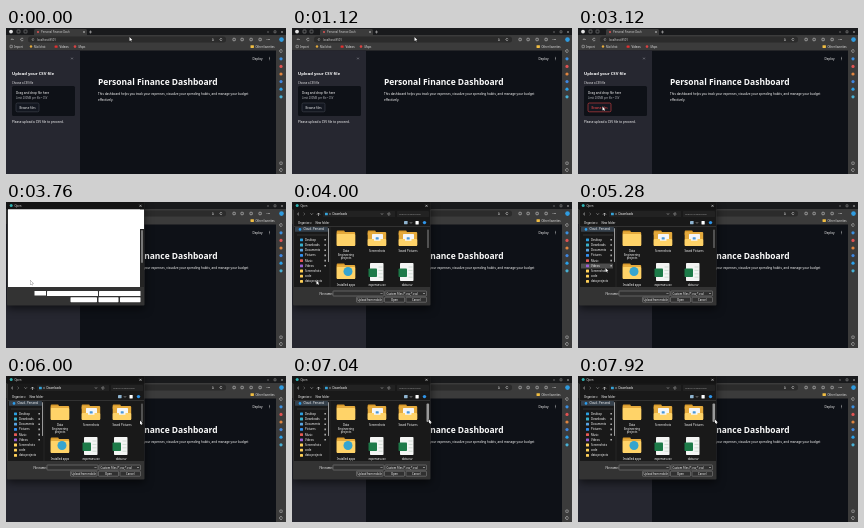
Recreate the animation shown at these times as an HTML page with a canvas. Size 280 by 146 pixels, loop 8000 ms.

```html
<!DOCTYPE html>
<html lang="en">
<head>
<meta charset="utf-8">
<title>Personal Finance Dashboard</title>
<style>
html, body { margin: 0; width: 100%; height: 100%; overflow: hidden; background: #0e1117; }
canvas { display: block; width: 280px; height: 146px; }
</style>
</head>
<body>
<canvas id="stage"></canvas>
<script>
const W = 280, H = 146, LOOP = 8000, STEP = 80;
const canvas = document.getElementById('stage');
const scale = window.devicePixelRatio || 1;
canvas.width = W * scale;
canvas.height = H * scale;
const g = canvas.getContext('2d');

function box(x, y, w, h, fill, r = 0, line) {
  g.beginPath();
  g.roundRect(x, y, w, h, r);
  if (fill) { g.fillStyle = fill; g.fill(); }
  if (line) { g.strokeStyle = line; g.lineWidth = 0.5; g.stroke(); }
}

function dot(x, y, r, fill) {
  g.beginPath();
  g.arc(x, y, r, 0, 7);
  g.fillStyle = fill;
  g.fill();
}

function ring(x, y, r, color) {
  g.beginPath();
  g.arc(x, y, r, 0.4, 6);
  g.strokeStyle = color;
  g.lineWidth = 0.6;
  g.stroke();
}

function path(color, ...pts) {
  g.beginPath();
  for (let i = 0; i < pts.length; i += 2) g.lineTo(pts[i], pts[i + 1]);
  g.strokeStyle = color;
  g.lineWidth = 0.6;
  g.stroke();
}

function text(s, x, y, size, color = '#fff', weight = 500, align = 'left') {
  g.font = `${weight} ${size}px "Noto Sans", "Open Sans", sans-serif`;
  g.textAlign = align;
  g.fillStyle = color;
  g.fillText(s, x, y);
}

function cross(x, y, r, color) {
  path(color, x - r, y - r, x + r, y + r);
  path(color, x + r, y - r, x - r, y + r);
}

function browser() {
  box(0, 0, W, 8, '#191a1c');
  box(0, 7, W, 16, '#3b3b3b');
  box(28, 1, 53, 7, '#3b3b3b', 1.5);
  dot(5, 3.6, 1.9, '#e4e4e4');
  box(11, 2, 3, 3, null, 0.5, '#aaa');
  box(18, 2, 3, 3, null, 0.5, '#999');
  dot(32, 4, 1, '#e05555');
  text('Personal Finance Dash', 35, 5, 2.7, '#d0d0d0');
  cross(78, 4, 0.8, '#ccc');
  path('#bbb', 83, 4, 86, 4);
  path('#bbb', 84.5, 2.5, 84.5, 5.5);
  path('#999', 261, 4, 263, 4);
  box(268, 2.8, 2, 2, null, 0, '#999');
  cross(276, 4, 1, '#999');

  path('#aaa', 8, 11.5, 5, 11.5, 6.3, 10.2);
  ring(16, 11.5, 1.3, '#ccc');
  box(22, 8.6, 198, 5.8, '#2b2b2b', 2.5);
  ring(27, 11.5, 0.9, '#bbb');
  text('localhost:8501', 31, 12.5, 2.8, '#d0d0d0');
  text('A', 206, 12.6, 2.8, '#ccc');
  ring(215, 11.5, 1.1, '#ccc');
  for (const x of [228, 236, 245, 254]) box(x - 1.1, 10.3, 2.4, 2.4, null, 0.4, '#e4e4e4');
  for (const x of [261, 262.3, 263.6]) dot(x, 11.5, 0.4, '#eee');
  dot(275.5, 11.6, 2.3, '#2f9bdf');

  box(4, 17.3, 2.4, 2.4, null, 0.3, '#ccc');
  text('Import', 8, 19.6, 2.7, '#ddd');
  dot(25, 18.5, 1.2, '#e2a93b');
  text('Mail chat', 28, 19.6, 2.7, '#ddd');
  box(48.6, 17.4, 3, 2.4, '#e33030', 0.5);
  text('Videos', 53.5, 19.6, 2.9, '#eee');
  dot(69, 18.6, 1.3, '#d94343');
  text('Maps', 72.5, 19.6, 2.7, '#ddd');
  box(244.5, 17.2, 3.4, 2.8, '#f0bd42', 0.4);
  text('Other favorites', 249.5, 19.6, 2.7, '#e6e6e6');

  box(270, 22, 10, 124, '#3b3b3b');
  ring(275, 23, 1.3, '#e0e0e0');
  ['#3b8fe0', '#e05252', '#e0843f', '#3f86e0', '#2aa0ea', '#48b0d4']
    .forEach((c, i) => dot(275, 30.8 + i * 7.6, 1.6, c));
  box(273.8, 134, 2.4, 2.4, null, 0.3, '#ccc');
  ring(275, 142, 1.4, '#ddd');
}

function page(hover) {
  box(0, 22.5, 270, 124, '#0e1117');
  box(0, 22.5, 74, 124, '#262730');
  cross(66, 30.5, 0.8, '#8f9099');
  text('Upload your CSV file', 6, 47.4, 4.2, '#fff', 600);
  text('Choose a CSV file', 6, 55.6, 2.65, '#f0f0f2');
  box(6, 58, 63, 30, '#0e1117', 1.5);
  text('Drag and drop file here', 10, 65.9, 3.05);
  text('Limit 200MB per file • CSV', 10, 71.3, 2.6, '#b4b6bc');
  box(10, 75, 23, 8.8, '#131720', 1.4, hover ? '#ff4b4b' : '#4b4e59');
  text('Browse files', 21.5, 80.6, 2.9, hover ? '#ff4b4b' : '#eee', 500, 'center');
  text('Please upload a CSV file to proceed.', 6, 95.1, 3.1);

  text('Deploy', 246.5, 31.6, 3.1);
  for (const y of [29.2, 30.5, 31.8]) dot(263.5, y, 0.4, '#fff');
  text('Personal Finance Dashboard', 92, 57, 8.45, '#fafafa', 700);
  text('This dashboard helps you track your expenses, visualize your spending habits, and manage your budget',
    92, 66.9, 3.08);
  text('effectively.', 92, 72.7, 3.08);
}

function folder(x, y, paper) {
  box(x - 9.3, y - 7.5, 8, 5, '#d99a2b', 1);
  box(x - 9.3, y - 6, 18.5, 14, '#e5aa3c', 1);
  if (paper) {
    box(x - 5, y - 4, 11, 7, '#f5f6f7', 0.6);
  }
  const top = paper ? 1 : -4;
  box(x - 9.3, y + top, 18.5, 8 - top, '#ffd368', 1);
  if (paper) {
    box(x - 3, y - 2.2, 6.5, 5, '#f5f6f7', 0.6);
    box(x - 1.3, y - 0.8, 3, 2.4, '#4a98d9', 0.5);
  }
}

function sheet(x, y) {
  box(x - 6.5, y - 9, 13.5, 18, '#f4f5f4', 0.7);
  for (let i = 0; i < 4; i++) path('#b9cfc0', x + 2, y - 5 + i * 3.4, x + 6, y - 5 + i * 3.4);
  box(x - 8, y - 3.5, 8.5, 8.5, '#1d7a48', 0.8);
}

function frame(blank) {
  g.save();
  g.shadowColor = 'rgba(0,0,0,.6)';
  g.shadowBlur = 8 * scale;
  g.shadowOffsetY = 3 * scale;
  box(1, 0, 137.5, 103.5, '#333333', 1);
  g.restore();
  box(1, 0, 137.5, 8, '#141414', 1);
  dot(5.2, 3.6, 1.5, '#2fb0b0');
  text('Open', 8.5, 4.6, 2.7, '#ddd');
  cross(134.5, 3.8, 1, '#ddd');
  if (blank) {
    box(2, 7.5, 136, 20, '#fff');
    box(2, 7.5, 132, 77.5, '#fff');
    box(134, 27, 4, 58, '#242424');
    box(135, 28, 2, 33, '#777', 1);
  }
}

function footer(blank) {
  const fields = [[41, 89, 51], [93, 89, 41.5], [64.5, 95.2, 26.5], [92.5, 95.2, 20], [114, 95.2, 20.5]];
  for (const [x, y, w] of fields) {
    box(x, y, w, 5, blank ? '#fff' : '#303030', 0.6, blank ? null : '#909090');
  }
  if (blank) { box(28.5, 89, 11.5, 4.5, '#fff'); return; }
  text('File name:', 27.5, 92.5, 2.7);
  text('Custom Files (*.csv;*.csv)', 94.5, 92.5, 2.7);
  path('#ccc', 88.5, 91, 89.5, 92, 90.5, 91);
  path('#ccc', 131, 91, 132, 92, 133, 91);
  text('Upload from mobile', 77.7, 98.6, 2.6, '#fff', 500, 'center');
  text('Open', 102.5, 98.6, 2.7, '#fff', 500, 'center');
  text('Cancel', 124.2, 98.6, 2.7, '#fff', 500, 'center');
}

function label(s, x, y) {
  text(s, x, y, 2.8, '#fff', 500, 'center');
}

function files(hoverNav, hoverBar) {
  box(2, 7.5, 136, 17, '#191919');
  path('#ddd', 7, 10.7, 5.5, 12, 7, 13.3);
  path('#777', 11.5, 10.7, 13, 12, 11.5, 13.3);
  path('#bbb', 18.5, 11.4, 19.7, 12.6, 20.9, 11.4);
  path('#ddd', 25, 12.6, 26.5, 11, 28, 12.6);
  path('#ddd', 26.5, 11, 26.5, 14);
  box(31, 9, 72, 6, '#222', 0.6);
  box(33, 10.7, 2.8, 2.6, '#35a3d8', 0.4);
  path('#ddd', 37.5, 11, 38.5, 12, 37.5, 13);
  text('Downloads', 40.5, 13, 2.8);
  path('#bbb', 89, 11.4, 90, 12.5, 91, 11.4);
  ring(97, 12, 1.1, '#ccc');
  box(105, 9, 32, 6, '#222', 0.6);
  text('Search Downloads', 107, 13, 2.5, '#999');
  text('Organize ▾', 6, 21.6, 2.7);
  text('New folder', 23.5, 21.6, 2.7);
  box(112, 19, 3.6, 3.2, '#8fb4d0', 0.4);
  path('#ddd', 118, 20.3, 119, 21.3, 120, 20.3);
  box(123.5, 19, 3.2, 3.4, '#fff', 0.3);
  dot(132.5, 20.6, 1.7, '#2f95ea');

  box(2, 24.5, 136, 60.5, '#191919');
  path('#404040', 2, 24.5, 138, 24.5);
  path('#303030', 38, 25, 38, 85);
  box(3, 25, 33, 4.8, '#36414c', 0.5);
  dot(8, 27.4, 1.3, '#2b9eee');
  text('Cloud - Personal', 11.5, 28.4, 2.7);
  path('#444', 5, 33, 35, 33);
  box(36, 26, 1, 34, '#9a9a9a', 0.5);

  if (hoverNav) box(3, 61.4, 32, 5, '#4d4d4d', 0.5);
  const nav = [
    ['Desktop', '#2b9fe0'], ['Downloads', '#39b0cc'], ['Documents', '#5aa6e4'],
    ['Pictures', '#3390f0'], ['Music', '#e55a55'], ['Videos', '#9a60d6'],
    ['Screenshots', '#ffd058'], ['code', '#ffd058'], ['data projects', '#ffd058']
  ];
  nav.forEach(([name, color], i) => {
    const y = 37.8 + i * 5.2;
    box(8, y - 1.4, 3, 2.8, color, 0.5);
    text(name, 13, y + 1, 2.8);
    if (i < 6) box(32.5, y - 0.8, 1.3, 1.6, '#ccc');
  });

  folder(54, 36);
  folder(85, 36, true);
  folder(116, 36, true);
  label('Data', 54, 49.9);
  label('Engineering', 54, 53.5);
  label('projects', 54, 57);
  label('Screenshots', 85, 49.9);
  label('Saved Pictures', 116, 49.9);
  folder(54, 69);
  dot(56, 69.5, 4.5, '#36a4cf');
  sheet(84.5, 70);
  sheet(114.5, 70);
  label('Installed apps', 54, 83.7);
  label('expenses.csv', 85, 83.7);
  label('data.csv', 115, 83.7);
  if (hoverBar) box(134.5, 27.5, 2.6, 18.5, '#9a9a9a', 1);
  else box(135.5, 27.5, 1, 18.5, '#8a8a8a', 0.5);
}

// time, x, y of the pointer tip
const route = [
  [0, 123.5, 9], [1040, 122.5, 9], [1680, 122.5, 9], [2160, 24.5, 78.5], [4480, 24.5, 78.5],
  [4720, 27.5, 66], [5360, 27.5, 66], [5520, 122, 50], [5680, 122, 50],
  [5920, 134, 44.5], [6560, 134, 44.5], [6800, 137, 43.5], [LOOP, 137, 43.5]
];

function pointer(t) {
  const i = route.findIndex(p => p[0] > t);
  const a = route[i - 1], b = route[i];
  const u = (t - a[0]) / (b[0] - a[0]);
  const k = u * u * (3 - 2 * u);
  const x = a[1] + (b[1] - a[1]) * k, y = a[2] + (b[2] - a[2]) * k;
  g.beginPath();
  for (const [dx, dy] of [[0, 0], [0, 4], [0.95, 3.2], [1.6, 4.6], [2.2, 4.3], [1.6, 3], [2.8, 2.9]]) {
    g.lineTo(x + dx, y + dy);
  }
  g.closePath();
  g.strokeStyle = '#111';
  g.lineWidth = 0.4;
  g.stroke();
  g.fillStyle = '#fff';
  g.fill();
}

function draw(now) {
  const t = Math.floor((now % LOOP) / STEP) * STEP;
  g.setTransform(scale, 0, 0, scale, 0, 0);
  browser();
  page(t >= 2160 && t < 4480);
  if (t >= 3680) {
    const blank = t < 3840;
    frame(blank);
    if (!blank) files(t >= 4640 && t < 5440, t >= 6560);
    footer(blank);
  }
  pointer(t);
}

const start = performance.now();
function tick() {
  draw(performance.now() - start);
  requestAnimationFrame(tick);
}
tick();
</script>
</body>
</html>
```
